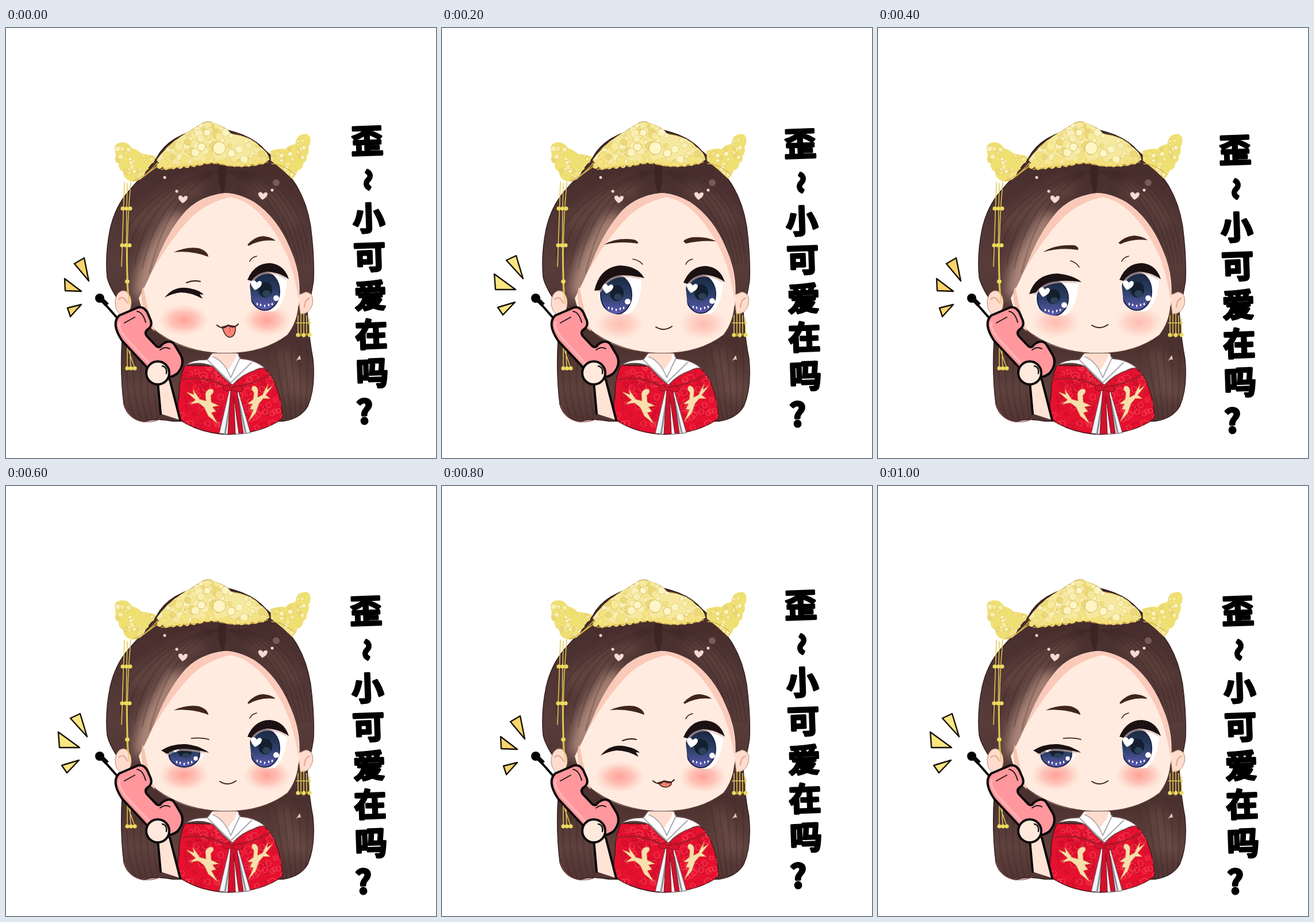
Recreate the animation shown at these times as an HTML page. Size 748x748 px, loop 1.2 s.

```html
<!DOCTYPE html>
<html lang="zh">
<head>
<meta charset="utf-8">
<style>
html, body { margin: 0; width: 100%; height: 100%; overflow: hidden; background: #fff; }
svg { display: block; width: 100vw; height: 100vh; }
text { font: 900 56px "Noto Sans CJK SC", "Noto Sans CJK", sans-serif; text-anchor: middle; stroke: #000; stroke-width: 3.6; stroke-linejoin: round; }
.line { fill: none; stroke-linecap: round; stroke-linejoin: round; }
.ink { stroke: #0b0808; stroke-width: 4; stroke-linejoin: round; stroke-linecap: round; }
</style>
</head>
<body>
<svg viewBox="0 0 748 748">
<defs>
  <linearGradient id="hair" gradientUnits="userSpaceOnUse" x1="0" y1="180" x2="0" y2="690">
    <stop offset="0" stop-color="#422928"/><stop offset=".25" stop-color="#4d3332"/>
    <stop offset=".45" stop-color="#573c3a"/><stop offset=".72" stop-color="#4a302e"/>
    <stop offset=".88" stop-color="#5f423e"/><stop offset="1" stop-color="#4f3332"/>
  </linearGradient>
  <linearGradient id="iris" x1="0" y1="0" x2="0" y2="1">
    <stop offset="0" stop-color="#18263f"/><stop offset=".5" stop-color="#2b4066"/><stop offset="1" stop-color="#5f5bb5"/>
  </linearGradient>
  <radialGradient id="blush">
    <stop offset="0" stop-color="#ff9d94"/><stop offset=".5" stop-color="#ffb1a6" stop-opacity=".75"/><stop offset="1" stop-color="#ffcabd" stop-opacity="0"/>
  </radialGradient>
  <filter id="soft" x="-50%" y="-50%" width="200%" height="200%"><feGaussianBlur stdDeviation="11"/></filter>
  <path id="locks" d="M262 226C276 199 306 181 350 173C392 176 430 188 452 214Q480 236 497 262Q522 295 530 345Q537 400 535 440Q531 466 524 490Q527 540 534 575Q539 625 525 658Q512 680 482 684L290 684Q262 678 240 685Q212 680 205 655Q198 600 202 540Q206 510 204 485Q181 455 176 434Q172 395 181 350Q190 310 214 283Q240 254 262 226Z"/>
  <path id="cape" d="M311 587Q300 612 301 640Q296 662 303 682Q340 706 388 707Q446 705 481 679Q481 650 468 618Q460 600 447 590Z"/>
  <path id="tiara" d="M262 230Q278 206 305 188Q326 176 336 169Q350 158 364 167Q382 172 392 184Q426 188 441 206Q456 216 458 229Q446 238 425 237Q405 243 382 238Q358 230 336 238Q310 238 277 247Z"/>
  <path id="hornL" d="M189 208Q192 198 203 199Q212 198 219 209Q230 212 236 219Q250 220 261 224L257 234Q247 238 248 245Q241 250 239 259Q230 268 218 267Q204 263 204 250Q195 247 196 236Q187 232 191 222Z"/>
  <path id="hornR" d="M460 214Q477 208 486 211Q492 203 503 202Q506 186 517 185Q526 182 529 191Q531 200 526 207Q529 216 523 222Q524 232 517 236Q516 246 507 248Q504 259 497 262Q484 248 461 231Z"/>
  <clipPath id="inHair"><use href="#locks"/></clipPath>
  <clipPath id="inCape"><use href="#cape"/></clipPath>
  <clipPath id="inTiara"><use href="#tiara"/></clipPath>
  <clipPath id="inL"><use href="#hornL"/></clipPath>
  <clipPath id="inR"><use href="#hornR"/></clipPath>
</defs>

<use href="#locks" fill="url(#hair)" stroke="#2e1b1b" stroke-width="1.3"/>
<g clip-path="url(#inHair)">
  <g filter="url(#soft)">
    <path d="M222 470Q226 400 285 325L320 320Q270 390 250 470Z" fill="#c79f8d" opacity=".85"/>
    <path d="M222 350Q262 296 340 276" fill="none" stroke="#7d5d55" stroke-width="24" opacity=".5"/>
    <path d="M425 275Q475 292 505 345" fill="none" stroke="#7d5d56" stroke-width="20" opacity=".45"/>
    <path d="M482 560Q490 600 512 640" fill="none" stroke="#83635a" stroke-width="18" opacity=".5"/>
  </g>
  <g id="strands" class="line" stroke="#321d1d" stroke-width="3" opacity=".2"></g>
  <path d="M370 240Q366 270 378 291Q384 270 383 240Z" fill="#3a2222" opacity=".7"/>
</g>
<path class="line" d="M206 655Q214 682 240 685Q258 686 268 680" stroke="#8a4a48" stroke-width="1.3"/>
<g fill="#ffdccd" stroke="#b98873"><ellipse cx="204" cy="478" rx="14" ry="21"/><path d="M522 459Q537 462 533 481Q527 499 512 497L508 465Z"/></g>
<path class="line" d="M196 472Q204 464 211 478M528 470Q520 472 519 486" stroke="#e5a58f" stroke-width="2"/>
<path d="M504 580L511 569L513 577Q508 575 504 580Z" fill="#f1c7bd"/>

<path d="M380 287Q338 292 313 318Q283 352 263 402Q248 438 231 470Q240 508 266 532Q312 566 384 566Q448 566 490 534Q508 510 510 474Q514 426 494 383Q472 330 432 303Q404 287 380 287Z" fill="#ffebdf"/>
<path class="line" d="M256 524Q310 566 384 566Q448 566 490 534Q507 512 509 484" stroke="#5a3a33" stroke-width="1.5"/>
<path d="M385 287Q338 292 313 318Q283 352 263 402L254 424Q285 368 322 330Q348 303 395 293Z" fill="#fac9b8"/>
<path d="M380 287Q404 287 432 303Q472 330 494 383Q512 424 509 474Q500 410 476 370Q446 318 412 301Q395 294 380 292Z" fill="#fbcaba"/>
<path d="M238 450Q230 475 250 520L259 528Q247 495 241 460Z" fill="#f8c4b1"/>

<g fill="#f8d9d3">
  <path id="heart" d="M307 305Q297 296 301 292Q306 290 308 295Q313 289 316 294Q316 300 307 305Z"/>
  <use href="#heart" x="139" y="-6"/>
  <circle cx="297" cy="284" r="2.5"/><circle cx="463" cy="282" r="2.5"/><circle cx="276" cy="260" r="2.5"/>
  <circle cx="470" cy="269" r="6" opacity=".25"/>
</g>

<use href="#hornL" fill="#efe072"/><use href="#hornR" fill="#efe072"/><use href="#tiara" fill="#f6e99f" stroke="#a98a35"/>
<g id="beadsL" clip-path="url(#inL)"></g><g id="beadsR" clip-path="url(#inR)"></g><g id="beadsT" clip-path="url(#inTiara)"></g>
<path class="line" d="M267 240Q300 243 336 235Q360 228 382 235Q420 241 454 230" stroke="#f3e07a" stroke-width="10" stroke-dasharray="0 12"/>
<g class="line" stroke="#d9b04a" stroke-width="1.6">
  <path d="M270 246Q302 241 337 239Q360 232 383 239Q420 244 455 233" stroke-dasharray="8 5"/>
  <path d="M222 266Q240 262 264 234M240 258Q252 248 264 240M462 236Q480 236 501 254"/>
</g>
<g fill="#fff6c8" stroke="#d8ba58"><circle cx="371" cy="209" r="11"/><circle cx="392" cy="218" r="7"/><circle cx="340" cy="207" r="7"/><circle cx="350" cy="182" r="6"/></g>

<g class="line" stroke="#e3ca55" stroke-width="1.5">
  <path d="M206 268L201 415M211 270Q208 370 211 462M217 268Q207 380 214 480M211 545V592M215 545L217 592M213 560L224 592"/>
  <path d="M518 493V538M508 500V532M513 497V536M523 500V534M528 506V537M505 513H530"/>
</g>
<g fill="#ecd95e" id="chain"></g>

<use href="#cape" fill="#e5112f" stroke="#4b1519" stroke-width="1.5"/>
<g id="swirls" class="line" clip-path="url(#inCape)" stroke-width="1.3"></g>
<path class="line" d="M304 612Q345 603 387 626Q430 621 458 603" stroke="#a81a2a" stroke-width="3"/>
<path d="M311 587Q325 576 350 577L358 566L404 566L407 575Q435 577 451 592Q442 590 432 596Q410 603 394 621Q380 611 362 590Q340 578 311 587Z" fill="#fff" stroke="#69484a" stroke-width="1.5"/>
<path d="M359 566L402 566L398 578L386 595Q374 578 360 572Z" fill="#ffdccd"/>
<path class="line" d="M350 577L391 617L427 582M360 572Q380 580 391 608L407 574" stroke="#a8a4ac" stroke-width="1.8"/>
<path d="M389 628L371 705Q397 709 425 704L403 628Z" fill="#f4f4f5" stroke="#63545a"/>
<path class="line" d="M391 645L381 706M404 645L417 704" stroke="#87929a" stroke-width="3"/>
<path d="M391 626L386 706H399L396 640L405 705H413L401 626Z" fill="#d0122c" stroke="#7f0d1d"/>
<path d="M394 626Q381 617 377 625Q378 635 394 629Q409 638 413 628Q409 618 394 626Z" fill="#d3152c" stroke="#83101f"/>
<g id="bird" fill="#f8dfae" stroke="#dda058" stroke-width=".8">
  <path d="M314 633L327 638L325 629L337 646L348 649L347 636Q350 627 359 628Q364 633 356 639L357 651L370 657L359 659L365 667L357 669L368 688L352 675L345 660L335 652L320 654L330 647Z"/>
</g>
<use href="#bird" transform="matrix(-.78 .12 0 1 709 -48)"/>

<path d="M264 616L269 671L303 682L285 612Z" fill="#ffe3d5"/>
<path class="line ink" d="M264 616L269 671M285 612L303 682" fill="none"/>
<path class="ink" d="M164 471L194 505" stroke-width="5"/><circle cx="163" cy="470" r="8"/><path d="M165 471L176 482" stroke="#0b0808" stroke-width="8"/>
<path class="ink" fill="#ff979d" d="M197 500L230 486Q240 484 246 495L252 509Q255 518 247 524Q240 529 245 536L261 553Q267 558 271 551Q284 541 292 549L304 569Q312 585 298 601Q284 611 271 607L245 590L202 544Q182 514 197 500Z"/>
<path class="line" d="M198 512Q193 519 209 540L249 583" stroke="#ffb3b5" stroke-width="4"/>
<path class="line" d="M228 493Q238 494 243 512M268 560Q277 553 285 558M206 513L224 503" stroke="#23181a" stroke-width="2"/>
<circle class="ink" cx="264" cy="600" r="20" fill="#ffe9dd"/>
<path class="line" d="M272 588Q281 590 279 601" stroke="#23181a" stroke-width="2.5"/>

<g id="face"></g>
<path id="sparks" stroke="#171006" stroke-width="2.4" stroke-linejoin="round"/>
<g id="words"></g>
</svg>
<script>
const el = id => document.getElementById(id);
let seed = 11;
const rnd = (a, b) => (seed = seed * 16807 % 2147483647, a + (b - a) * seed / 2147483647);
const fill = (id, n, make) => el(id).innerHTML = Array.from({ length: n }, (_, i) => make(i)).join("");

const golds = ["#fbf4c3", "#f7ea9b", "#ecd878", "#f9efb4", "#f4e382"];
const beads = (id, n, x0, x1, y0, y1, big) => fill(id, n, i =>
  `<circle cx="${rnd(x0, x1)}" cy="${rnd(y0, y1)}" r="${rnd(2, big)}" fill="${golds[i % 5]}" stroke="#e0c766" stroke-width=".7"/>`);
beads("beadsT", 150, 262, 458, 164, 246, 8);
beads("beadsL", 50, 188, 262, 198, 266, 5);
beads("beadsR", 50, 459, 530, 183, 262, 5);

fill("strands", 10, i => {
  const k = i % 5 * 20;
  return i < 5 ? `<path d="M${372 - k / 4} 250Q${285 - k} ${280 + k / 4} ${250 - k * .65} ${425 - k / 3}"/>`
    : `<path d="M${385 + k / 3} 250Q${475 + k / 2} ${285 - k / 5} ${502 + k / 3} 410M${468 + k * .7} 560Q${478 + k * .6} 620 ${488 + k * .4} 680M${212 + k * .6} 575Q${205 + k * .6} 630 ${225 + k * .5} 680"/>`;
});
fill("swirls", 130, i => {
  const r = rnd(3, 8);
  return `<path d="M${rnd(298, 480)} ${rnd(590, 705)}a${r} ${r} 0 1 1 ${r} ${r}q${-r} 0 ${-r / 2} ${-r}" stroke="${i % 2 ? "#c70d2b" : "#f63d52"}"/>`;
});
fill("chain", 15, i => {
  const y = [314, 378, 592, 441, 534][i / 3 | 0], j = i % 3;
  const x = i < 9 ? [203, 202, 211][i / 3 | 0] + j * 6.5 : i < 12 ? 211 : 508 + j * 10;
  return `<circle cx="${x}" cy="${y}" r="3.6"/>`;
});

el("words").innerHTML = [..."歪～小可爱在吗?"].map((c, i) => {
  const x = i < 7 ? 628 + i * 1.5 : 624, y = 196 + i * 67.3;
  return c == "～"
    ? `<text transform="translate(630 264) rotate(90)" y="14" style="font-size:36px;stroke-width:5">～</text>`
    : `<text transform="translate(${x} ${y}) rotate(-2)" y="21">${c}</text>`;
}).join("");

const line = (d, w = 1.6, c = "#3a2220") => `<path class="line" d="${d}" stroke="${c}" stroke-width="${w}"/>`;
const shape = (d, c = "#1b1112") => `<path d="${d}" fill="${c}"/>`;

function eye(id, x, y, rx, ry, open, lash, glint = 1) {
  const stars = [-13, -7, 0, 7, 13].map(k =>
    `<ellipse cx="${x + k}" cy="${y + ry * .77 - Math.abs(k) * .25}" rx="1.3" ry="2.2"/>`).join("");
  return `<clipPath id="${id}"><path d="${open}"/></clipPath>${shape(open, "#fff")}
    <g clip-path="url(#${id})"><ellipse cx="${x}" cy="${y}" rx="${rx}" ry="${ry}" fill="url(#iris)" stroke="#1c2142" stroke-width="2"/>
    <ellipse cx="${x + 1}" cy="${y - 3}" rx="12" ry="${ry * .42}" fill="#14202f"/>
    <ellipse cx="${x + 3}" cy="${y + 4}" rx="7" ry="${ry * .18}" fill="#2b4258"/>
    <g fill="#fff">${stars}</g>
    <path class="line" d="${lash}" stroke="#d9b3ac" stroke-width="7" opacity=".6"/></g>
    <g fill="#fff"><path transform="translate(${x - 15} ${y - 12 * glint}) scale(${glint})" d="M-2 10Q-12 0 -8 -6Q-2 -9 1 -3Q7 -9 10 -3Q11 4 -2 10Z"/>
    <circle cx="${x + 20}" cy="${y + 12 * glint}" r="${5 * glint}"/></g>${shape(lash)}`;
}

const rightEye = dy => `<g transform="translate(0 ${dy})">` + eye("er", 450, 463, 26, 33,
  "M424 450Q430 422 456 423Q482 425 489 445Q486 482 468 497Q438 502 427 482Z",
  "M420 443Q432 414 459 414Q484 416 492 442L486 438Q473 430 454 429Q436 431 427 445Z")
  + line("M424 411Q427 404 436 402") + `</g>`;

const wideEye = eye("el", 303, 464, 27, 34,
  "M271 456Q276 423 312 422Q341 424 347 440Q347 478 328 496Q290 505 276 478Z",
  "M265 457Q274 416 310 413Q340 414 352 435Q332 430 311 430Q287 432 275 456Z") + line("M332 402Q343 404 349 411");
const lowEye = eye("el", 304, 470, 27, 31,
  "M270 462Q280 434 312 434Q342 436 348 446Q347 482 328 499Q290 506 276 482Z",
  "M263 463Q274 428 312 427Q340 430 354 442Q330 438 307 441Q286 444 275 460Z") + line("M335 405Q345 408 350 416");
const halfEye = eye("el", 310, 465, 27, 24,
  "M277 463Q312 447 347 463C340 482 326 490 310 490C294 490 284 480 277 463Z",
  "M270 460Q288 448 313 449Q338 452 353 464Q330 458 309 457Q290 458 280 466Z", .75) + line("M322 439Q340 437 353 441");
const wink = shape("M276 469Q290 450 314 452Q336 455 344 464L337 463L342 471Q322 460 304 460Q288 462 276 469Z") + line("M314 443Q326 438 338 441", 2);

const brow = d => shape(d, "#40251f");
const levelBrows = brow("M282 377Q302 364 334 368Q342 371 341 375Q310 370 282 377Z") + brow("M420 371Q422 367 435 364Q460 362 477 371Q448 369 424 375Z");
const liftBrows = brow("M287 390Q308 376 342 378Q350 381 348 386Q316 381 287 390Z") + brow("M418 374Q430 362 446 361Q460 362 469 369Q442 366 422 376Z");
const slyBrows = brow("M292 390Q314 380 335 383Q351 388 352 398Q324 387 292 390Z") + brow("M420 377Q432 363 447 362Q461 363 469 370Q442 367 422 379Z");

const blush = (o, y) => [309, 454].map((x, i) =>
  `<ellipse cx="${x}" cy="${y}" rx="${44 - i * 2}" ry="28" fill="url(#blush)" opacity="${o}"/>`).join("");
const smile = y => line(`M372 ${y}Q386 ${y + 9} 400 ${y - 1}`, 2);
const tongue = (y, h) => `<path d="M376 ${y + 3}Q381 ${y + h} 390 ${y + h}Q400 ${y + h - 2} 399 ${y + 2}L387 ${y}Z" fill="#f98478" stroke="#51261f" stroke-width="1.6"/>`
  + line(`M389 ${y + 4}V${y + h * .55}`, 1.3, "#d3564f") + line(`M367 ${y}Q378 ${y + 9} 386 ${y}Q396 ${y + 7} 404 ${y - 2}`, 2.2);

const sly = blush(.95, 503) + halfEye + rightEye(-7) + slyBrows + smile(514);
const poses = [
  [0, 0, blush(.95, 508) + wink + rightEye(-5) + slyBrows + tongue(517, 21)],
  [-5, 5, blush(.6, 515) + wideEye + rightEye(0) + levelBrows + smile(520)],
  [-7, 16, blush(.6, 512) + lowEye + rightEye(-5) + liftBrows + smile(517)],
  [-2, 21, sly],
  [-4, 11, blush(.95, 506) + wink + rightEye(-6) + slyBrows + tongue(513, 11)],
  [-2, 21, sly]
];
const sparks = [
  ["M119 410L136 400L144 440ZM102 436L131 458L103 457ZM131 481L107 487L112 502Z", "#f9d56b"],
  ["M112 404L129 396L141 436ZM91 428L128 455L93 455ZM127 477L97 486L106 499Z", "#fbe681"]
];

let shown = -1;
function draw() {
  const step = Math.floor(performance.now() / 200) % 6;
  if (step != shown) {
    shown = step;
    const [dx, dy, look] = poses[step], [d, c] = sparks[step % 2];
    el("face").innerHTML = look;
    el("words").setAttribute("transform", `translate(${dx} ${dy})`);
    el("sparks").setAttribute("d", d);
    el("sparks").setAttribute("fill", c);
  }
  requestAnimationFrame(draw);
}
draw();
</script>
</body>
</html>
```
